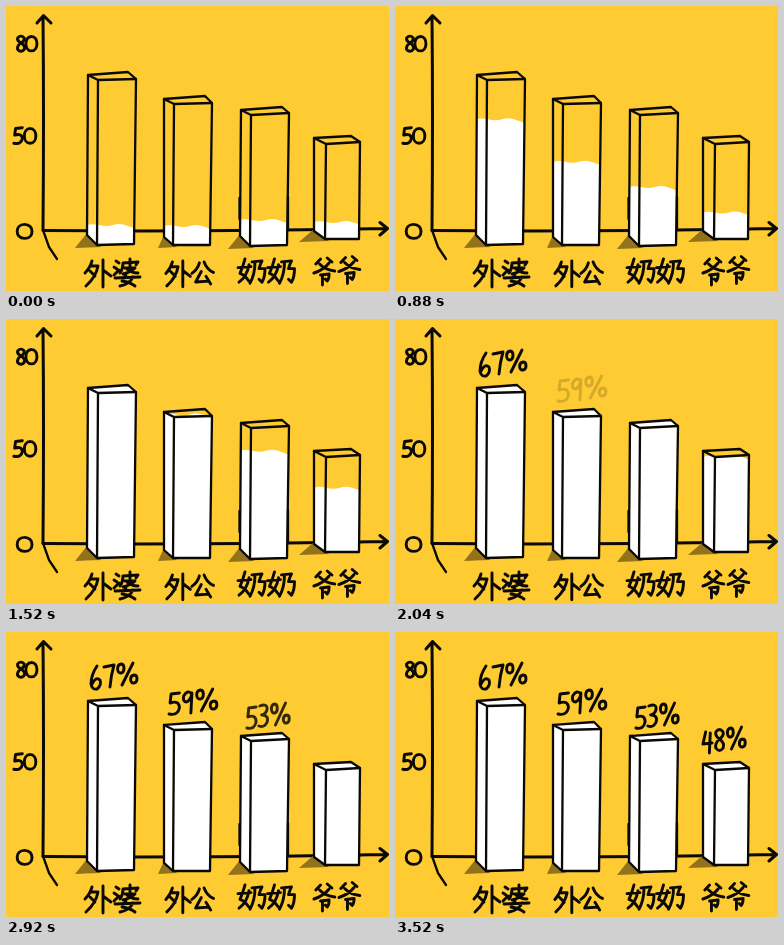
Recreate the animation shown at these times as an HTML page. Size 383 by 285 pixels, loop 3840 ms.

```html
<!DOCTYPE html>
<html lang="zh">
<head>
<meta charset="utf-8">
<title>柱状图</title>
<style>
html, body { margin: 0; width: 100%; height: 100%; overflow: hidden; background: #ffcb32; }
svg { display: block; width: 100vw; height: 100vh; }
path { fill: none; stroke: #0b0905; stroke-width: 2.3; stroke-linecap: round; stroke-linejoin: round; }
.axis { stroke-width: 3; }
.glyph path { stroke-width: 2.9; vector-effect: non-scaling-stroke; }
.shadow { fill: #92721b; stroke: none; }
.fill { fill: #fff; stroke: none; }
</style>
</head>
<body>
<svg id="stage" viewBox="0 0 383 285" role="img" aria-label="外婆 67%，外公 59%，奶奶 53%，爷爷 48%"></svg>
<script>
const LOOP = 3840, STEP = 40;
const stage = document.getElementById('stage');

// Pen strokes: Han characters in a 30 x 30 box, digits in 12 x 24
const GLYPHS = {
  外: 'M9 3Q7 10 2 15M7 8L15 8Q13 19 3 28M7 13L12 18M20 2L20 29M20 12L28 18',
  婆: 'M4 3L7 5M2 9L5 11M2 17L7 12M11 5L26 4L24 7M11 5Q11 11 8 15M18 1V9M13 10H23Q19 14 11 16M15 11Q19 15 26 15M14 17L10 23Q18 24 23 28M21 19Q18 26 8 28M3 20L28 19',
  公: 'M10 4Q8 11 2 15M15 3Q18 11 25 14M12 13L6 24L20 23M17 18L22 26',
  奶: 'M8 3Q6 11 3 18Q8 20 12 26M12 9Q10 21 2 27M1 12L14 11M15 6L25 5Q23 9 22 13L28 13Q28 22 25 27L22 24M18 6Q18 19 13 28',
  爷: 'M9 3L4 8M16 2L21 6M18 7Q12 14 2 17M8 8Q14 14 24 15M9 19L18 18Q18 23 16 25L14 23M11 19V29',
  0: 'M6 2C-3 2 -3 22 6 22S15 2 6 2',
  3: 'M2 2Q10 -1 10 5Q9 10 4 11Q12 11 10 18Q7 24 1 22',
  4: 'M4 2L1 14L11 13M9 3L8 23',
  5: 'M11 1L3 2L2 11Q11 8 11 16Q9 24 1 22',
  6: 'M7 0Q1 9 1 18Q2 24 7 23Q12 19 10 14Q6 10 2 18',
  7: 'M1 3L11 1Q8 11 7 23',
  8: 'M10 4Q6 -1 2 4Q1 8 6 11Q12 15 10 20Q6 25 2 20Q1 15 6 11Q11 8 10 4',
  9: 'M10 4Q6 -1 2 6Q1 12 5 12Q9 10 10 3L9 23',
  '%': 'M5 2C0 3 1 12 5 11S9 2 5 2M17 1L6 23M18 13C13 14 14 22 18 21S22 13 18 13'
};

// top: back left, back right, front right, front left; from/to: fill levels
const BARS = [
  { top: [82, 69, 122, 66, 130, 73, 92, 74], foot: [81, 229, 91, 239, 128, 238], shade: 69, from: 219, to: 64, start: 0, end: 1290 },
  { top: [158, 93, 199, 90, 206, 97, 168, 98], foot: [158, 231, 167, 239, 204, 239], shade: 152, from: 220, to: 86, start: 200, end: 1620 },
  { top: [235, 104, 276, 101, 283, 107, 245, 109], foot: [234, 230, 244, 240, 281, 239], shade: 222, from: 214, to: 98, start: 450, end: 1960 },
  { top: [308, 132, 345, 130, 354, 136, 320, 138], foot: [308, 225, 319, 233, 353, 233], shade: 293, from: 216, to: 126, start: 720, end: 2240 }
];

// text, x, y, advance, scale x, scale y, rise per character
const LABELS = [
  ['80', 10, 29, 10.5, .82, .72, 0], ['50', 7, 121, 12, .85, .74, 0], ['0', 12, 217, 0, 1.1, .7, 0],
  ['外婆', 77, 252, 29, 1, 1, 0], ['外公', 158, 253, 26, .94, .96, 0],
  ['奶奶', 231, 250, 29.5, 1, .97, 0], ['爷爷', 306, 250, 25, .95, 1, 1.5]
];

// text, x, y, scale x, start, end
const RATES = [
  ['67%', 84, 34, 1, 1520, 2000], ['59%', 162, 60, 1.04, 1960, 2440],
  ['53%', 240, 74, .92, 2520, 3000], ['48%', 307, 98, .92, 3040, 3520]
];

function add(parent, tag, attrs) {
  const el = document.createElementNS('http://www.w3.org/2000/svg', tag);
  for (const key in attrs) el.setAttribute(key, attrs[key]);
  return parent.appendChild(el);
}
const pen = (d, cls = '', parent = stage) => add(parent, 'path', { d, class: cls });

function write(text, x, y, advance, sx, sy, rise) {
  const g = add(stage, 'g', { class: 'glyph' });
  [...text].forEach((c, i) => add(g, 'path', {
    d: GLYPHS[c],
    transform: `translate(${x + i * advance} ${y - i * rise}) scale(${sx} ${sy})`
  }));
  return g;
}

function addBar(bar, i) {
  const [ax, ay, bx, by, cx, cy, dx, dy] = bar.top;
  const [lx, ly, fx, fy, rx, ry] = bar.foot;
  const outline = `M${ax} ${ay}L${bx} ${by}L${cx} ${cy}L${rx} ${ry}L${fx} ${fy}L${lx} ${ly}Z`;
  pen(`M${bar.shade} ${fy + 3}L${lx} ${ly - 2}L${fx + 4} ${fy + 2}Z`, 'shadow');
  const clip = add(stage, 'clipPath', { id: 'bar' + i });
  pen(outline, '', clip);
  const box = add(stage, 'g', { 'clip-path': `url(#bar${i})` });
  const fill = pen(`M${lx - 4} 1q8 -3 16 -1t14 0t12 0t14 5V200H${lx - 4}Z`, 'fill', box);
  pen(outline);
  pen(`M${ax} ${ay}L${dx} ${dy}L${cx} ${cy}M${dx} ${dy}L${fx} ${fy}`);
  return fill;
}

pen('M37 10Q38 110 37 224M31 17L37.5 9.5L45 17', 'axis');
pen('M37 224L43 241L51 253');
pen('M37 224.5Q200 226 381 222.5M374 216.5L381.5 222.5L374 229', 'axis');
const fills = BARS.map(addBar);
pen('M233.5 192V213M282 191V222');
LABELS.forEach(label => write(...label));
const rates = RATES.map(([text, x, y, sx]) => write(text, x, y, 13 * sx, sx, 1, 2));

const progress = (t, start, end) => Math.min(1, Math.max(0, (t - start) / (end - start)));

function draw(t) {
  BARS.forEach(({ from, to, start, end }, i) => {
    const y = from + (to - from) * progress(t, start, end);
    fills[i].setAttribute('transform', `translate(0 ${y})`);
  });
  RATES.forEach(([, , , , start, end], i) => {
    rates[i].setAttribute('opacity', progress(t, start, end));
  });
}

const begin = performance.now();
function tick() {
  const t = (performance.now() - begin) % LOOP;
  draw(Math.floor(t / STEP) * STEP);
  requestAnimationFrame(tick);
}
tick();
</script>
</body>
</html>
```
